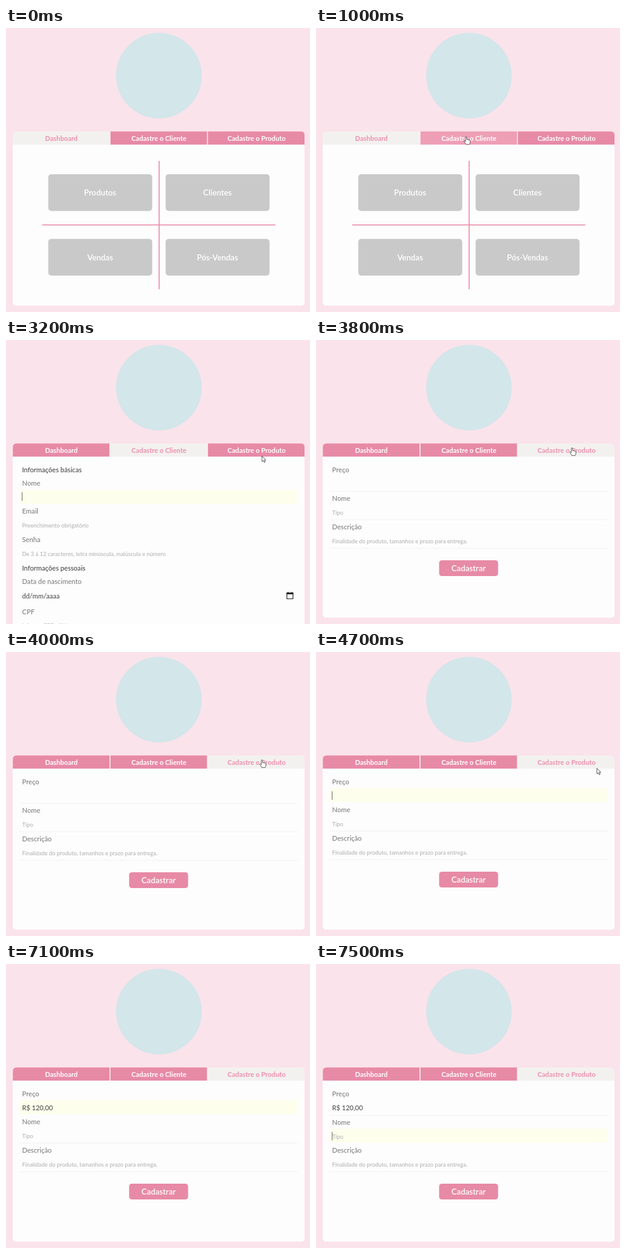
An HTML page that plays this animation: 500 px wide and 468 px high, repeating every 8000 ms.

```html
<!DOCTYPE html>
<html lang="pt-BR">
<head>
<meta charset="utf-8">
<title>Dashboard</title>
<style>
  html, body { margin: 0; width: 100%; height: 100%; overflow: hidden; background: #fae3ea; }
  svg { display: block; width: 500px; height: 468px; font: 500 11.2px Lato, "Open Sans", sans-serif; }
  .tab { font-weight: 700; font-size: 11.1px; text-anchor: middle; }
  .big { font-size: 13.2px; font-weight: 600; text-anchor: middle; fill: #fff; }
  .section { font-size: 11.1px; fill: #484848; }
  .label { fill: #808080; }
  .value { font-size: 11px; fill: #505050; }
  .hint { font-size: 9.3px; fill: #b4b4b4; }
</style>
</head>
<body>
<svg viewBox="0 0 500 468">
  <circle cx="251.5" cy="78.5" r="70.5" fill="#d3e6ea"/>
  <g id="page"></g>
  <rect id="caret" width="1" height="14" fill="#6b6b60"/>
  <g id="cursor" fill="#fff" stroke="#333" stroke-linejoin="round">
    <path id="arrow" stroke-width=".8" d="M0 0V9.5L2.2 7.6 3.8 10.8 5.3 10 3.8 7H6.4Z"/>
    <path id="hand" stroke-width=".8" d="M-1 .4Q0-1 1 .4V4.4Q2.2 3.6 3 4.8 4.2 4 4.8 5.2 6.4 4.6 6.5 6.4V9Q6.4 11 5.2 12.4H-.2Q-1.4 10-3.4 7.6-3.6 6-2.2 6.4L-1 7.6Z"/>
  </g>
</svg>
<script>
const LOOP = 8000, PINK = '#e78aa5', HOVER = '#ee9eb5';
const $ = id => document.getElementById(id);
const page = $('page'), caret = $('caret');

const text = (cls, x, y, s, extra = '') => `<text class="${cls}" x="${x}" y="${y + 4}" ${extra}>${s}</text>`;
const rect = (x, y, w, h, fill, r = 0) => `<rect x="${x}" y="${y}" width="${w}" height="${h}" rx="${r}" fill="${fill}"/>`;
const field = y => rect(22, y, 458, 23, '#fdfeec');
const line = y => rect(22, y, 458, 1, '#f2f2f2');

// Pointer path: time, x, y
const path = [
  [500, 22, 1], [700, 117, 91], [1000, 247, 179.5], [2200, 247, 179.5],
  [2700, 330, 215], [2800, 330, 215], [3200, 421, 191], [3500, 421, 178],
  [4500, 421, 178], [4900, 503, 205]
];
function pointer(t) {
  const i = path.findIndex(p => p[0] > t);
  if (i < 1) return null;
  const [a, x, y] = path[i - 1], [b, u, v] = path[i], k = (t - a) / (b - a);
  return [x + (u - x) * k, y + (v - y) * k];
}

const prices = [[5700, 'R$ 0,01'], [5800, 'R$ 0,12'], [6100, 'R$ 1,20'], [6500, 'R$ 12,00'], [6600, 'R$ 120,00']];
const price = t => prices.reduce((s, [at, v]) => t >= at ? v : s, '');

// Times when the text caret is visible
const carets = [[1800, 2300], [2900, 3400], [4300, 4800], [5300, 7100], [7500, 8000]];

function tabs(active, hover, pressed) {
  const names = ['Dashboard', 'Cadastre o Cliente', 'Cadastre o Produto'];
  const mids = [91, 251.5, 412], edges = [[11.3, 170.2], [172, 330.5], [332.2, 491]];
  return names.map((name, i) => {
    let [l, r] = edges[i];
    const on = i === active;
    if (on) { l = [11, 170.2, 331][i]; r = [171, 332.2, 491][i]; }
    const fill = on ? (pressed ? '#fdfdfd' : '#f3f1f0') : i === hover ? HOVER : PINK;
    const a = i === 0 ? 6 : 0, b = i === 2 ? 6 : 0;
    return `<path fill="${fill}" d="M${l} 192.4V${170.4 + a}q0-${a} ${a}-${a}H${r - b}q${b} 0 ${b} ${b}V192.4Z"/>` +
      text('tab', mids[i], 181.5, name, `fill="${on ? '#ec91ab' : '#fff'}"`);
  }).join('');
}

// White panel; the long client form runs past the stage
const panel = bottom => `<path fill="#fdfdfd" d="M11 192.3H491V${bottom - 5.5}q0 5.5-5.5 5.5H16.5q-5.5 0-5.5-5.5Z"/>`;

function dashboard() {
  const card = (x, y, s) => rect(x, y, 171, 60.5, '#c9c9c9', 5) + text('big', x + 85.3, y + 31, s);
  return panel(457.5) + rect(251, 219, 1.6, 211.5, PINK) + rect(59.5, 323.7, 383.5, 1.6, PINK) +
    card(69.5, 241, 'Produtos') + card(262.5, 241, 'Clientes') +
    card(69.5, 347.5, 'Vendas') + card(262.5, 347.5, 'Pós-Vendas');
}

function client() {
  const rows = [
    ['section', 213.5, 'Informações básicas'], ['label', 235.5, 'Nome'],
    ['label', 281.5, 'Email'], ['hint', 304.5, 'Preenchimento obrigatório'],
    ['label', 328.5, 'Senha'], ['hint', 351.5, 'De 3 á 12 caracteres, letra minúscula, maiúscula e número'],
    ['section', 375.5, 'Informações pessoais'], ['label', 397.5, 'Data de nascimento'],
    ['value', 421.5, 'dd/mm/aaaa'], ['label', 447.5, 'CPF'], ['hint', 469.5, 'Informe CPF válido']
  ];
  return panel(480) + field(247) + rows.map(([c, y, s]) => text(c, 26.5, y, s)).join('') +
    '<path d="M462 417H472V426.5H462Z" fill="none" stroke="#222" stroke-width="1.2"/>' +
    rect(461.5, 416.4, 11, 2.7, '#222') + rect(463.3, 415, 1.3, 2, '#222') + rect(469.4, 415, 1.3, 2, '#222');
}

function product(t) {
  const focus = t < 4300 ? -1 : t < 7500 ? 0 : 1;
  const rows = [['Preço', price(t), 'value'], ['Nome', 'Tipo', 'hint'],
    ['Descrição', 'Finalidade do produto, tamanhos e prazo para entrega.', 'hint']];
  let y = 213.5, out = panel(457.5);
  rows.forEach(([name, s, cls], i) => {
    const on = i === focus;
    out += (on ? field(y + 11) : line(y + 35.2)) + text('label', 26.5, y, name) +
      text(cls, 26.5, y + 23.3, s, i ? '' : 'id="price"');
    y += on ? 46 : 47;
  });
  y += 8.5;
  return out + rect(202.5, y, 97, 26, PINK, 4.5) + text('big', 251, y + 13.5, 'Cadastrar');
}

let shown;
function draw(now) {
  const t = Math.floor(now % LOOP / 100) * 100;
  if (t !== shown) {
    shown = t;
    const view = t < 1800 ? 0 : t < 3800 ? 1 : 2;
    const p = pointer(t);
    const overTab = p && p[1] >= 170 && p[1] < 191 && p[0] < 491;
    const hover = overTab ? (p[0] < 171 ? 0 : p[0] < 331 ? 1 : 2) : -1;

    page.innerHTML = tabs(view, hover, view === 1 && hover === 1) + [dashboard, client, product][view](t);

    const typing = view === 2 && t < 7500;
    caret.style.display = carets.some(([a, b]) => t >= a && t < b) ? '' : 'none';
    caret.setAttribute('x', typing && price(t) ? 27 + $('price').getComputedTextLength() : 26);
    caret.setAttribute('y', view === 1 ? 251 : typing ? 229.5 : 276.5);

    $('cursor').style.display = p ? '' : 'none';
    if (p) $('cursor').setAttribute('transform', `translate(${p})`);
    $('arrow').style.display = overTab ? 'none' : '';
    $('hand').style.display = overTab ? '' : 'none';
  }
  requestAnimationFrame(draw);
}
draw(performance.now());
</script>
</body>
</html>
```
